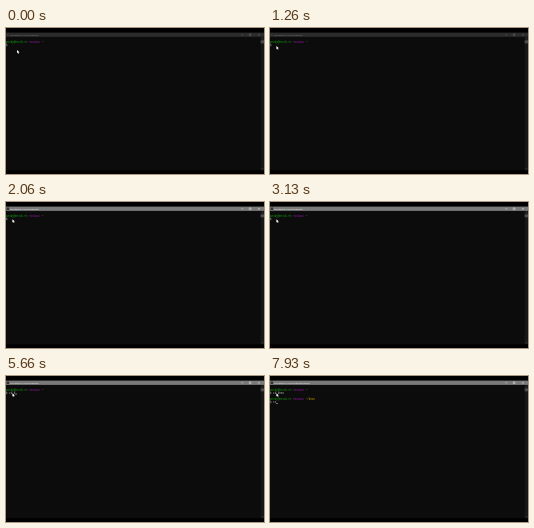
These frames come from a looping animation (258x146 px, 8 s). An HTML page:

```html
<!DOCTYPE html>
<html lang="en">
<head>
<meta charset="utf-8">
<title>Terminal</title>
<style>
  html, body { margin: 0; width: 100%; height: 100%; overflow: hidden; background: #000; }
  svg { display: block; width: 258px; height: 146px; }
  text { white-space: pre; }
  .mono { font: 13.333px "Liberation Mono", monospace; fill: #bbb; }
  .user { fill: #13a10e; }
  .sys { fill: #881798; }
  .path { fill: #c19c00; }
  .title { font: 12px "Open Sans", sans-serif; }
  .bar { fill: #2b2b2b; }
  .ink { fill: #888; }
  .line { fill: none; stroke: #777; stroke-width: .4; }
  .active .bar { fill: #7a7a7a; }
  .active .ink { fill: #fff; }
  .active .line { stroke: #fff; }
</style>
</head>
<body>
<svg viewBox="0 0 258 146">
  <rect width="258" height="146" fill="#000"/>
  <rect y="8.8" width="258" height="133.4" fill="#0c0c0c"/>

  <g id="head">
    <rect class="bar" y="4.6" width="258" height="4.3"/>
    <rect x=".6" y="5.5" width="2.5" height="2.5" fill="#333"/>
    <g transform="translate(4.2 7.7) scale(.19375)">
      <text id="title" class="title ink"></text>
    </g>
    <path class="line" d="M235.4 6.8h1.8M243.3 5.9h1.7v1.7h-1.7zM252.1 5.9l1.7 1.7m0-1.7l-1.7 1.7"/>
  </g>

  <rect x="254.7" y="9" width="3.3" height="133.2" fill="#171717"/>
  <rect x="254.7" y="12.3" width="3.3" height="3" fill="#4d4d4d"/>
  <path d="M255.5 11.2l.9-.9.9.9M255.5 140.4l.9.9.9-.9" fill="none" stroke="#777" stroke-width=".4"/>

  <!-- character cells of 8 by 16 units -->
  <g transform="translate(0 9.2) scale(.19375)">
    <text class="mono" y="28"><tspan class="user">wendy@Brook-PC</tspan> <tspan class="sys">MINGW64</tspan> <tspan class="path">~</tspan></text>
    <text class="mono" id="first" y="44"></text>
    <g id="next">
      <text class="mono" y="76"><tspan class="user">wendy@Brook-PC</tspan> <tspan class="sys">MINGW64</tspan> <tspan class="path">~/demo</tspan></text>
      <text class="mono" id="second" y="92"></text>
    </g>
    <rect id="caret" width="8" height="3.5" fill="#ccc"/>
  </g>

  <path id="mouse" d="M0 0v3.2l.8-.7.6 1.2.6-.3-.5-1.2h1z" fill="#fff"/>
</svg>
<script>
  const LOOP = 8000, FRAME = 1000 / 15, BLINK = 590;
  const FOCUS = 2060, CARET = 2530, FIRST_KEY = 4130, TYPING = 5260;
  const ENTER = 6800, PROMPT = 7260, SECOND = 7800;
  const $ = id => document.getElementById(id);

  const ramp = (t, from, to) => Math.min(1, Math.max(0, (t - from) / (to - from)));
  const smooth = k => k * k * (3 - 2 * k);
  const show = (id, on) => { $(id).style.display = on ? "" : "none"; };

  // Keys pressed by t when one falls every gap ms
  const keys = (t, start, gap) => Math.max(0, Math.floor((t - start) / gap) + 1);

  function type(id, text, count) {
    const typed = text.slice(0, count);
    $(id).textContent = "$ " + typed;
    return typed.length;
  }

  function movePointer(time) {
    const t = Math.floor(time / FRAME + .1) * FRAME;
    const drop = ramp(t, 130, 330);
    const jump = ramp(t, 800, 860);
    const glide = smooth(ramp(t, 860, 1260));
    const settle = smooth(ramp(t, 1400, 1730));
    const x = 11 + 3 * jump - 7.6 * glide;
    const y = 22 + 3 * drop - 5 * jump - 2 * glide - .8 * settle;
    $("mouse").setAttribute("transform", `translate(${x} ${y})`);
  }

  function moveCaret(t, row, col) {
    const since = [PROMPT, ENTER, TYPING, FIRST_KEY, CARET].find(start => t >= start);
    const busy = t >= TYPING;
    const lit = since && (busy || Math.floor((t - since) / BLINK) % 2 === 0);
    $("caret").setAttribute("x", col * 8);
    $("caret").setAttribute("y", row * 16 + 12);
    show("caret", lit);
  }

  function draw(t) {
    const entered = t >= ENTER, ready = t >= PROMPT;
    $("head").setAttribute("class", t >= FOCUS ? "active" : "");
    $("title").textContent = "MINGW64:/c/Users/wendy" + (ready ? "/demo" : "");
    show("next", ready);

    const a = type("first", "cd demo", (t >= FIRST_KEY) + keys(t, TYPING, 170));
    const b = type("second", "co", keys(t, SECOND, 130));
    const [row, col] = ready ? [5, 2 + b] : entered ? [3, 0] : [2, 2 + a];
    moveCaret(t, row, col);
    movePointer(t);
  }

  const start = performance.now();
  function tick() {
    draw((performance.now() - start) % LOOP);
    requestAnimationFrame(tick);
  }
  tick();
</script>
</body>
</html>
```
